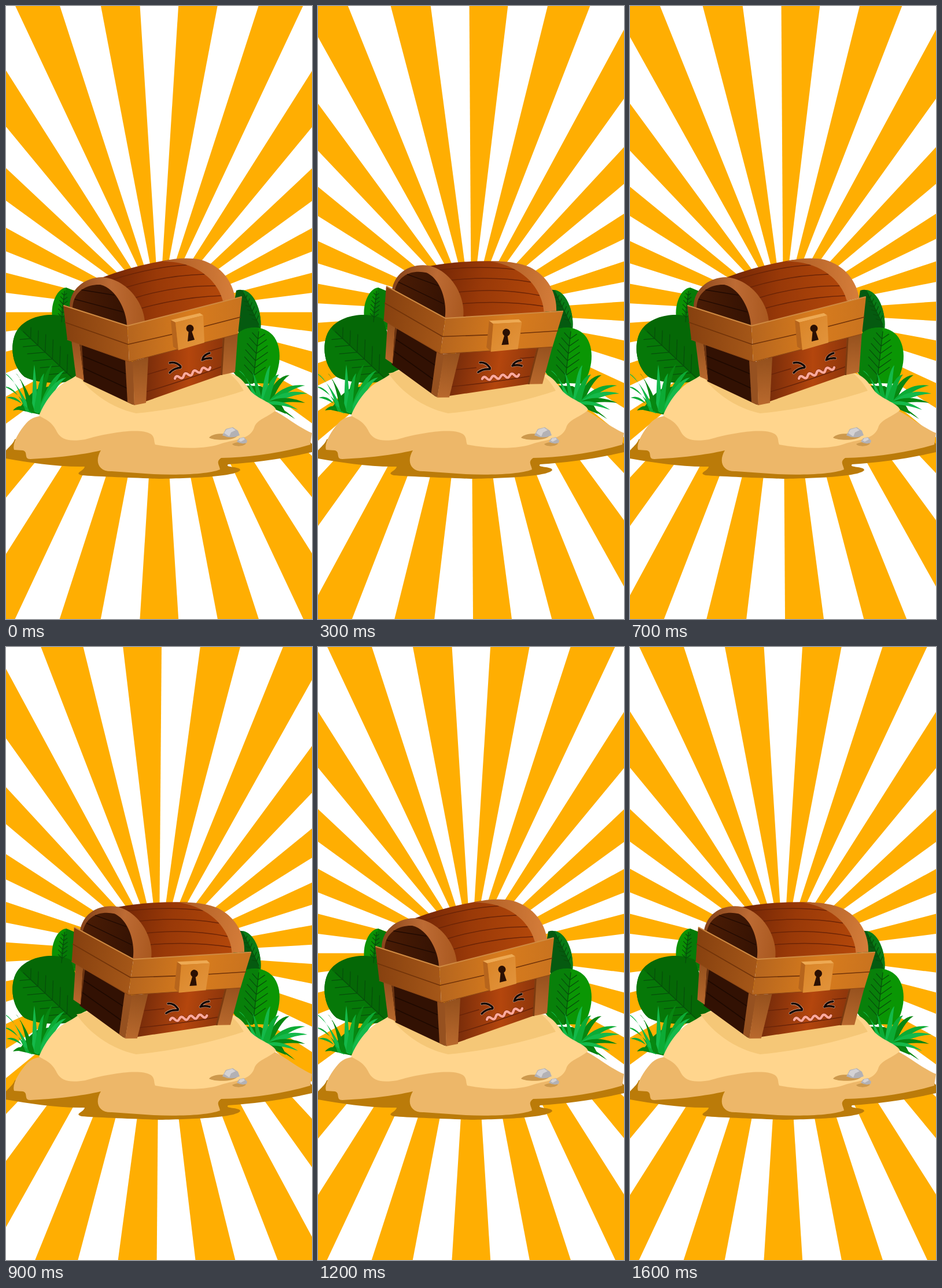
An HTML page for the animation above (1700 ms loop, 529 by 1058 pixels).

```html
<!DOCTYPE html>
<html lang="en">
<head>
<meta charset="utf-8">
<title>Treasure chest</title>
<style>
  html, body { margin: 0; height: 100%; overflow: hidden; background: #fff; }
  svg { display: block; }
  .line { fill: none; stroke-linecap: round; stroke-linejoin: round; }
</style>
</head>
<body>
<svg width="529" height="1058" viewBox="0 0 529 1058">
  <defs>
    <linearGradient id="lidTop"><stop offset="0" stop-color="#6f2405"/><stop offset=".45" stop-color="#993908"/><stop offset="1" stop-color="#b4480a"/></linearGradient>
    <linearGradient id="lidEnd"><stop offset="0" stop-color="#4a1c05"/><stop offset="1" stop-color="#341203"/></linearGradient>
    <linearGradient id="bandLeft"><stop offset="0" stop-color="#87441b"/><stop offset=".55" stop-color="#bd6b34"/><stop offset="1" stop-color="#a9581f"/></linearGradient>
    <linearGradient id="bandRight"><stop offset="0" stop-color="#ad5c25"/><stop offset="1" stop-color="#d67e3a"/></linearGradient>
    <linearGradient id="rimLeft"><stop offset="0" stop-color="#86400f"/><stop offset="1" stop-color="#a55718"/></linearGradient>
    <linearGradient id="rimFront"><stop offset="0" stop-color="#b5651e"/><stop offset=".55" stop-color="#d87c1d"/><stop offset="1" stop-color="#c9731f"/></linearGradient>
    <linearGradient id="front"><stop offset="0" stop-color="#782c0a"/><stop offset=".55" stop-color="#b4460d"/><stop offset="1" stop-color="#8c350b"/></linearGradient>
    <linearGradient id="plate" x2="1" y2="1"><stop offset="0" stop-color="#d98427"/><stop offset="1" stop-color="#e3953d"/></linearGradient>
    <linearGradient id="leg" x2="0" y2="1"><stop offset="0" stop-color="#94501d"/><stop offset="1" stop-color="#b9692d"/></linearGradient>
  </defs>

  <g id="rays" fill="#ffae02"></g>

  <g id="leaves">
    <path fill="#0a9205" d="M80 540C76 508 92 486 104 486L121 493V560Z"/>
    <path fill="#067a08" d="M104 486L121 493V555L90 548Z"/>
    <path fill="#056806" d="M32 640C8 620 5 577 22 556C41 532 86 527 112 540L145 640C112 652 60 655 32 640Z"/>
    <path fill="#067808" d="M32 640C8 620 5 577 22 556L118 645C86 650 50 650 32 640Z"/>
    <path fill="#055a10" d="M398 491C424 482 444 525 440 558L410 578L390 540Z"/>
    <path fill="#087b16" d="M409 490C430 493 443 528 440 558Z"/>
    <path fill="#0a9604" d="M400 566C416 551 445 551 461 568C480 590 474 629 459 652L408 650L388 625Z"/>
    <path fill="#08800a" d="M400 566C412 555 425 554 437 557L427 652H408L388 625Z"/>
  </g>
  <g id="veins" class="line" stroke="#064f0a" stroke-width="1.3"></g>
  <g id="grass"></g>

  <g id="island">
    <path fill="#bb7b09" d="M0 767C5 761 12 756 15 748L60 730H505L529 756V770C482 781 429 788 384 791C377 797 405 794 405 801C397 812 325 815 265 816C212 814 156 812 131 810C116 806 135 803 136 795C90 796 40 788 0 781Z"/>
    <path fill="#edb769" d="M14 766C10 755 22 735 35 720C45 709 56 708 65 707L463 698C486 710 507 728 529 737L526 757C475 772 420 779 372 780C362 787 369 792 370 800C350 808 300 810 255 808L183 803C159 804 153 785 164 767C131 775 84 780 42 782C30 782 39 769 29 767Z"/>
    <path fill="#ffd58d" d="M57 707C65 687 83 658 108 646C123 638 132 629 143 627L386 633C406 638 414 653 424 666C439 680 463 686 467 697C455 709 433 713 429 728C422 748 396 748 373 755C348 765 300 765 258 757C255 751 258 743 249 738C230 727 170 738 137 748C113 752 96 750 88 735C80 717 67 713 57 707Z"/>
    <path fill="#f5c777" d="M122 634C142 665 182 694 225 703C291 697 360 681 411 664C403 650 394 640 383 632L240 610Z"/>
    <path fill="#cd994d" d="M351 745C360 734 389 739 400 742C394 750 362 751 351 745ZM391 756C400 751 412 753 415 755C411 761 394 761 391 756Z"/>
    <path fill="#b3b1b4" d="M374 741L380 730L392 727L401 733L404 741Q389 748 374 741ZM399 752L403 746L411 744L417 750L416 754Q407 757 399 752Z"/>
    <path fill="#d4d2d4" d="M377 737L381 731L391 728L397 732L389 736L386 743ZM402 750L405 746L411 745L413 748L406 752Z"/>
  </g>

  <g id="chest">
    <path fill="#321103" d="M112 576L210 610L219 688L134 648Z"/>
    <path class="line" stroke="#1e0901" stroke-width="1.6" d="M130 603L210 636M132 624L210 660"/>
    <path fill="url(#front)" d="M240 604L378 568L374 636L240 683Z"/>
    <path class="line" stroke="#6a2408" stroke-width="1.5" d="M244 636L278 626M350 596L374 589M242 666Q310 646 374 622"/>
    <path fill="url(#leg)" d="M113 577L127 581L135 646L121 640Z"/>
    <path fill="#6c3411" d="M127 581L131 583L135 646Z"/>
    <path fill="#965120" d="M206 611L220 614L222 689L210 684Z"/>
    <path fill="url(#leg)" d="M219 613L246 606L242 685L222 689Z"/>
    <path fill="url(#leg)" d="M375 569L401 563L396 632L372 637Z"/>
    <path fill="#7c3b10" d="M375 569L378 568L374 637H371Z"/>

    <path fill="url(#lidTop)" d="M165 469Q220 448 282 438C330 436 365 470 378 510L238 548Z"/>
    <path class="line" stroke="#6c2406" stroke-width="1.5" d="M184 472Q255 450 312 447M206 486Q275 465 343 463M222 504Q294 482 362 483M233 522Q305 502 373 500"/>
    <path fill="url(#bandRight)" d="M270 441C292 435 318 434 337 438C374 449 392 477 396 504L375 509C368 481 337 440 270 441Z"/>
    <path fill="url(#bandLeft)" d="M110 521C109 491 133 469 166 468C207 471 238 510 240 546L207 553L112 522Z"/>
    <path fill="url(#lidEnd)" d="M115 521C116 493 139 480 163 481C189 487 208 523 209 552Z"/>
    <path class="line" stroke="#210a02" stroke-width="1.3" d="M131 490L187 499M119 506L202 528"/>

    <path fill="url(#rimLeft)" d="M99 517L210 552L213 614L106 576Z"/>
    <path fill="url(#rimFront)" d="M210 552L408 502L401 566L213 614Z"/>
    <path class="line" stroke="#713309" stroke-width="1.6" d="M102 546L211 584L290 566M343 553L405 537"/>
    <path class="line" stroke="#cf8a42" stroke-width="2" d="M100 517L210 552L407 502"/>
    <path class="line" stroke="#8f4815" stroke-width="1.2" d="M106 576L213 614L401 566"/>

    <path fill="#b7651c" d="M285 542L293 546L298 594L289 588Z"/>
    <path fill="#eda953" d="M285 542L335 530L341 534L293 546Z"/>
    <path fill="url(#plate)" d="M293 546L341 534L343 581L298 594Z"/>
    <g fill="#2b1003">
      <circle cx="318" cy="556.5" r="6.5"/>
      <path d="M316 558L314 579L326 576L320 558Z"/>
    </g>

    <g class="line">
      <path id="eyes" d="M283 616Q293 613 302 622M283 633Q290 625 302 624M352 599Q344 601 340 608M355 608Q347 607 339 611"/>
      <path id="mouth" transform="translate(292 643) rotate(-17.5)" d="M0 0q4 -6 8 0t8 0t8 0t8 0t8 0t8 0t8 0t8 0"/>
    </g>
  </g>
</svg>
<script>
const $ = id => document.getElementById(id);
const make = (parent, attrs, tag = 'path') => {
  const node = document.createElementNS('http://www.w3.org/2000/svg', tag);
  for (const key in attrs) node.setAttribute(key, attrs[key]);
  return parent.appendChild(node);
};

// 25 wedges, each half as wide as the spacing
const SPACING = 360 / 25, REACH = 700;
const half = REACH * Math.tan(SPACING / 4 * Math.PI / 180);
for (let i = 0; i < 25; i++) {
  make($('rays'), {
    d: `M0 0L${-half} ${-REACH}H${half}Z`,
    transform: `rotate(${(i + .5) * SPACING})`
  });
}

// Midrib from a to b with pairs of side veins pointing back towards a
function veins(ax, ay, bx, by, size) {
  const angle = Math.atan2(ay - by, ax - bx);
  let d = `M${ax} ${ay}L${bx} ${by}`;
  for (let i = 1; i < 7; i++) {
    const k = i / 7, x = ax + (bx - ax) * k, y = ay + (by - ay) * k;
    const length = size * Math.sin(Math.PI * (.1 + .6 * k));
    for (const side of [-.85, .85]) {
      d += `M${x} ${y}l${length * Math.cos(angle + side)} ${length * Math.sin(angle + side)}`;
    }
  }
  make($('veins'), { d });
}
veins(30, 562, 118, 645, 34);
veins(437, 562, 427, 650, 26);
veins(101, 492, 96, 545, 10);
veins(411, 496, 437, 550, 9);

// Slender blades arch up from the root and droop at the tip
function tuft(rootX, rootY, tips) {
  tips.forEach(([x, y], i) => {
    const root = rootX + (x - rootX) * .2;
    const bendX = root + (x - root) * .45, bendY = y + (rootY - y) * .35 - 16;
    make($('grass'), {
      d: `M${root - 5} ${rootY}Q${bendX - 3} ${bendY} ${x} ${y}Q${bendX + 3} ${bendY + 12} ${root + 6} ${rootY + 4}Z`,
      fill: ['#078711', '#0cab35', '#14b94a'][i % 3]
    });
  });
}
make($('grass'), { fill: '#05800f', d: 'M22 697Q36 672 56 660L84 655L62 706ZM410 655L440 656Q470 670 484 704L450 690Z' });
tuft(50, 699, [[12, 698], [-3, 657], [-4, 633], [17, 634], [1, 676], [49, 619], [80, 618], [101, 629], [104, 641], [23, 644], [66, 634]]);
tuft(442, 684, [[500, 713], [384, 640], [402, 629], [393, 652], [424, 628], [457, 620], [490, 637], [517, 655], [521, 669], [517, 685], [472, 636], [505, 697]]);

// Face strokes: outer edge under a dark or pink core
function outlined(id, outer, outerWidth, inner, innerWidth) {
  const path = $(id), copy = path.cloneNode();
  copy.removeAttribute('id');
  path.setAttribute('stroke', outer);
  path.setAttribute('stroke-width', outerWidth);
  copy.setAttribute('stroke', inner);
  copy.setAttribute('stroke-width', innerWidth);
  path.after(copy);
}
outlined('eyes', '#d9b5a4', 4.6, '#160803', 3.5);
outlined('mouth', '#7b2b12', 5.4, '#ffaa9d', 4.2);

const RAY_ANGLES = [0, 4.05, 7.2, 10.45];
const TILTED = 'translate(271 505.3) rotate(10.8) translate(-253.5 -509.5)';

function draw() {
  const step = Math.floor(performance.now() % 1700 / 100);
  $('rays').setAttribute('transform', `translate(264.8 528.4) rotate(${RAY_ANGLES[step % 4]})`);
  $('chest').setAttribute('transform', step % 6 < 3 ? '' : TILTED);
  requestAnimationFrame(draw);
}
draw();
</script>
</body>
</html>
```
